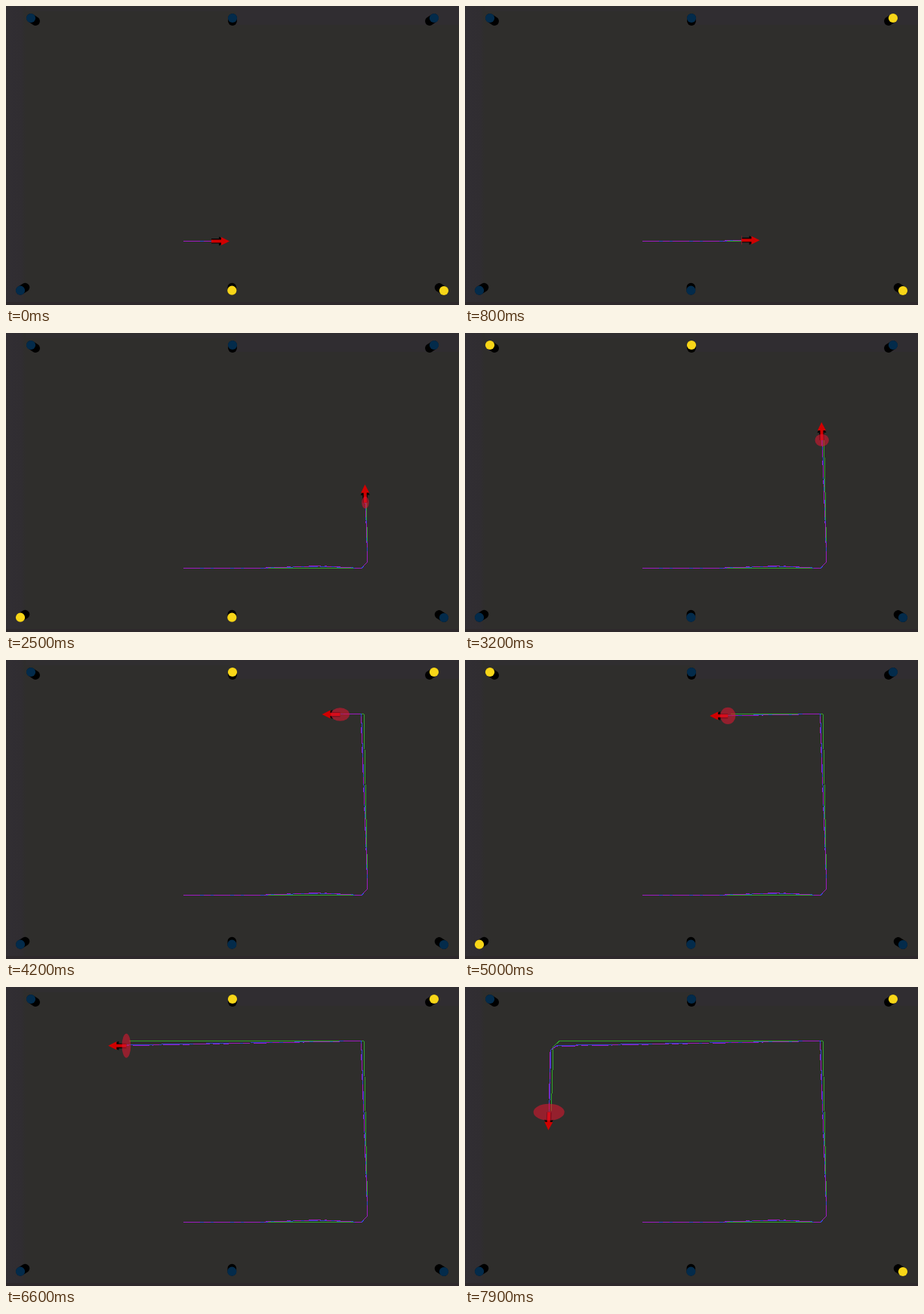
Recreate the animation shown at these times as an HTML page. Size 600 by 396 pixels, loop 8000 ms.

```html
<!DOCTYPE html>
<html lang="en">
<head>
<meta charset="utf-8">
<title>Landmark tracking</title>
<style>
  html, body { margin: 0; width: 100%; height: 100%; overflow: hidden; background: #2f2e2c; }
  svg { display: block; width: 100vw; height: 100vh; }
</style>
</head>
<body>
<svg viewBox="0 0 600 396">
  <defs>
    <linearGradient id="edge">
      <stop offset="0" stop-color="#312e33"/>
      <stop offset=".8" stop-color="#302d31"/>
      <stop offset="1" stop-color="#2f2e2c"/>
    </linearGradient>
  </defs>
  <rect width="600" height="396" fill="#2f2e2c"/>
  <rect width="600" height="7" fill="#302e30"/>
  <rect x="304" width="296" height="25" fill="#302d31"/>
  <rect width="26" height="396" fill="url(#edge)"/>
  <rect y="392" width="600" height="4" fill="#2e292c"/>
  <g id="posts"></g>
  <g id="trails" fill="none" shape-rendering="crispEdges"></g>
  <g id="robot">
    <path d="M0-3.5H10V-6L14-4V4L10 6V3H0Z" fill="#050505"/>
    <path d="M0-2H13V-5.5L24 0L13 5.5V2H0Z" fill="#d00000"/>
  </g>
  <ellipse id="spread" fill="#dc1730" fill-opacity=".58"/>
</svg>
<script>
const LOOP = 8000, STEP = 100, SPEED = 0.118, HEAD_START = 37;
const NS = 'http://www.w3.org/2000/svg';
const byId = id => document.getElementById(id);
const mix = (a, b, f) => a + (b - a) * f;
const degrees = (dx, dy) => (Math.atan2(-dy, dx) * 180 / Math.PI + 360) % 360;

function set(node, attrs) {
  for (const key in attrs) node.setAttribute(key, attrs[key]);
}
function add(parent, tag, attrs) {
  const node = document.createElementNS(NS, tag);
  set(node, attrs);
  return parent.appendChild(node);
}

// True corners; ex, ey: error of the estimate; rx, ry: its uncertainty.
const route = [
  { x: 235, y: 311.5, ex: 0, ey: 0, rx: 0, ry: 0 },
  { x: 330, y: 311.5, ex: 0, ey: 0, rx: .5, ry: 6 },
  { x: 415, y: 311.5, ex: 0, ey: -3, rx: .5, ry: 7 },
  { x: 471, y: 311.5, ex: 0, ey: 0, rx: .5, ry: 8, wait: 50 },
  { x: 479, y: 303, ex: 0, ey: 0, rx: .5, ry: 8 },
  { x: 474, y: 71.5, ex: -4, ey: 0, rx: 13, ry: 8, wait: 170 },
  { x: 125, y: 71.5, ex: -4, ey: 7, rx: 5, ry: 17, wait: 165 },
  { x: 117, y: 79, ex: -4, ey: 5, rx: 5.5, ry: 16.5 },
  { x: 114, y: 172, ex: -3, ey: 2, rx: 22, ry: 10.5 }
];

// Constant speed between corners, with a wait at some to turn.
let clock = -HEAD_START / SPEED;
route.forEach((p, i) => {
  const next = route[i + 1];
  p.arrive = clock;
  p.leave = clock += p.wait || 0;
  if (!next) return;
  p.heading = degrees(next.x - p.x, next.y - p.y);
  clock += Math.hypot(next.x - p.x, next.y - p.y) / SPEED;
});

function stateAt(t) {
  const i = Math.min(route.findLastIndex(p => p.arrive <= t), route.length - 2);
  const a = route[i], b = route[i + 1], state = { index: i };
  const f = Math.min(1, Math.max(0, (t - a.leave) / (b.arrive - a.leave)));
  for (const key of ['x', 'y', 'ex', 'ey', 'rx', 'ry']) state[key] = mix(a[key], b[key], f);
  state.heading = t < a.leave
    ? mix(route[i - 1].heading, a.heading, ((t - a.arrive) / a.wait) ** 3)
    : a.heading;
  return state;
}

// Each trail carries a share of the estimate's error.
const trails = [
  { share: 0, stroke: '#2fa52a' },
  { share: .85, stroke: '#3048d0' },
  { share: 1, stroke: '#9c1cc0', 'stroke-dasharray': '22 5 9 4' }
].map(({ share, ...look }) => ({ share, node: add(byId('trails'), 'polyline', look) }));

// Clockwise round the field; bases lean towards the centre.
const posts = [
  [33, 16], [300, 16], [567, 16], [580, 377], [299.3, 376.7], [19, 376.7]
].map(([x, y]) => {
  add(byId('posts'), 'path', {
    d: `M${x} ${y}L${mix(x, 300, .023)} ${mix(y, 196, .023)}`,
    stroke: '#000', 'stroke-width': 11.6, 'stroke-linecap': 'round'
  });
  return { x, y, top: add(byId('posts'), 'circle', { cx: x, cy: y, r: 6.1 }) };
});

// The sensor sweeps clockwise; the two posts it passed last are lit.
function litPosts(x, y, angle) {
  const passed = p => ((degrees(p.x - x, p.y - y) - angle) % 360 + 360) % 360;
  return [...posts].sort((a, b) => passed(a) - passed(b)).slice(0, 2);
}

function draw(t) {
  const now = stateAt(t), x = now.x + now.ex, y = now.y + now.ey;

  for (const { share, node } of trails) {
    const points = [...route.slice(0, now.index + 1), now]
      .map(p => [p.x + p.ex * share, p.y + p.ey * share]);
    node.setAttribute('points', points.join(' '));
  }
  set(byId('robot'), { transform: `translate(${x} ${y}) rotate(${-now.heading})` });
  set(byId('spread'), { cx: x, cy: y, rx: now.rx, ry: now.ry });

  const lit = litPosts(x, y, now.heading - 139 - 120.5 * t / STEP);
  for (const p of posts) p.top.setAttribute('fill', lit.includes(p) ? '#f8d618' : '#032b4b');
}

const start = performance.now();
function frame() {
  const t = (performance.now() - start) % LOOP;
  draw(Math.floor(t / STEP) * STEP);
  requestAnimationFrame(frame);
}
frame();
</script>
</body>
</html>
```
